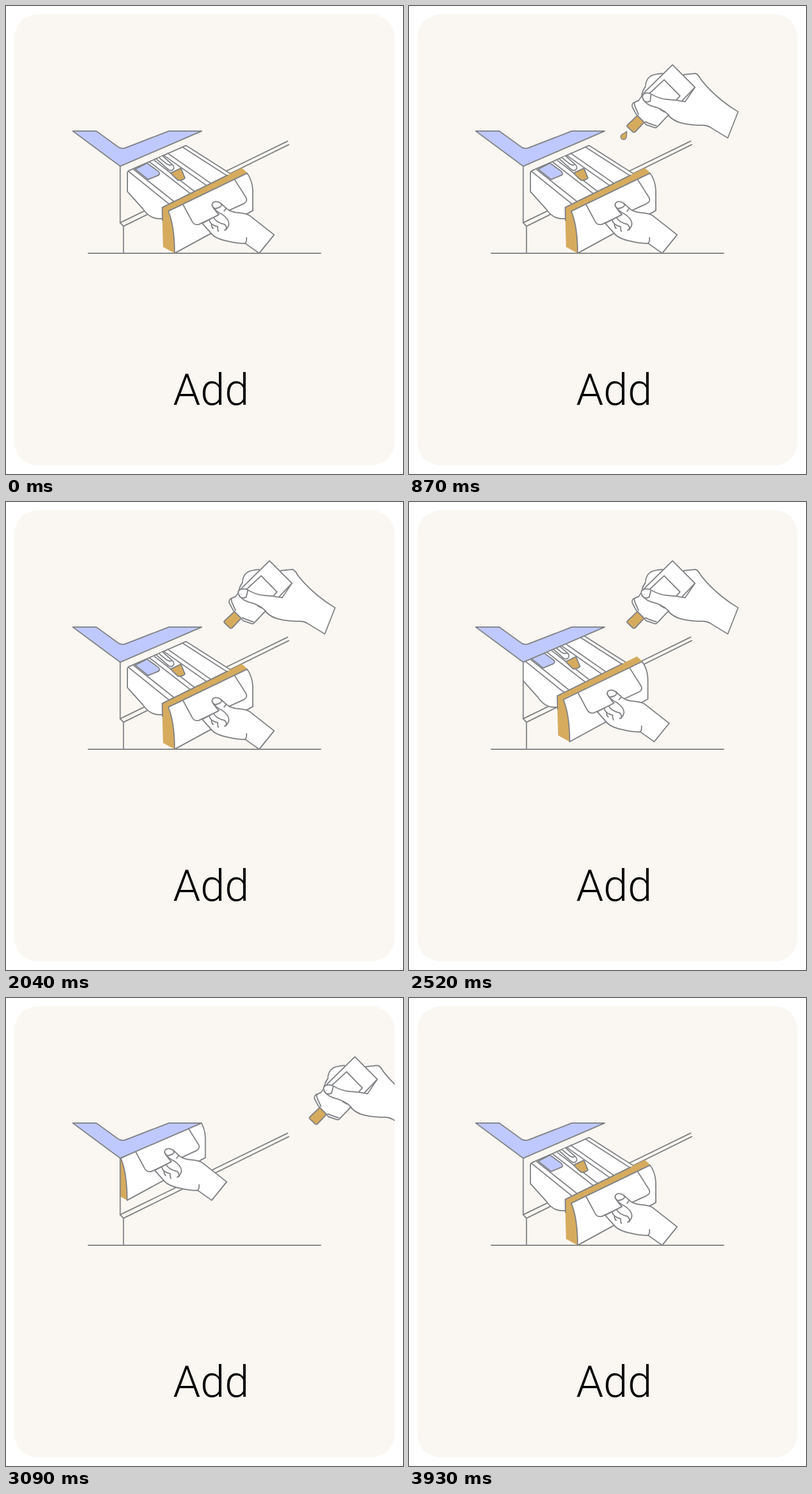
An HTML page that plays this animation: 690x812 px, repeating every 4.53 s.

```html
<!DOCTYPE html>
<html lang="en">
<head>
<meta charset="utf-8">
<title>Add</title>
<style>
  html, body { margin: 0; width: 100%; height: 100%; overflow: hidden; background: #fff; }
  svg { display: block; width: 690px; height: 812px; }
  .line, .white, .blue, .gold { stroke: #808285; stroke-width: 2; stroke-linejoin: round; stroke-linecap: round; }
  .line { fill: none; }
  .white { fill: #fff; }
  .blue { fill: #bfc9fd; }
  .gold { fill: #d6ab5e; }
  .bare { stroke: none; }
  text { font: 300 76px Roboto, sans-serif; }
</style>
</head>
<body>
<svg viewBox="0 0 690 812">
  <defs>
    <clipPath id="cardClip"><rect x="14" y="14" width="661.5" height="784"/></clipPath>
    <clipPath id="cabinetClip"><path d="M198.5 278L340 217V0H690V812H198.5Z"/></clipPath>
  </defs>

  <rect x="14.5" y="14.5" width="661" height="782.5" rx="40" fill="#faf7f2"/>
  <text x="290.5" y="692">Add</text>

  <path class="line" d="M143 429H547M198.5 376L489.5 234.5M204.5 382L491.5 240.5"/>

  <g clip-path="url(#cabinetClip)">
    <g id="drawer">
      <!-- tray -->
      <path class="white bare" d="M211 289L313 242L390 291L290 368H264Q249 368 238 352L211 322Z"/>
      <path class="line" d="M275 369H264Q249 368 238 352L211 322V290Q211 287 214 285.5L313 242L390 291"/>
      <path class="line" d="M213 287L284 344M221 283L293 340M250 271L321 326M258 268L328 322M274 259L348 311M281 255.5L355 307M307 245L385 295"/>
      <path class="blue" d="M224.5 283L245 272.5L265 287Q269 292 264 294L247 301Z"/>
      <path class="white" d="M262 266L279 281Q285 287 289 285Q294 281 290 276L272 260"/>
      <path class="line" d="M267 264L278 273Q284 278 288 275"/>
      <path class="gold" d="M286 290L304 281.5L311 298.5Q306 303 299 302.5Z"/>
      <!-- front -->
      <path class="gold bare" d="M271 349L410 281L420 290L282 356Q293 380 293 429L273 418Z"/>
      <path class="line" d="M272 372L271.5 349.5L385 293.5"/>
      <path class="white" d="M282 356L419 290Q428 302 429 320V355L293 429Q293 382 282 356Z"/>
      <path class="line" d="M308 345L322 371Q326 381 335 379L413 343Q421 339 417 332L398 302"/>
      <!-- pulling hand -->
      <path class="white" d="M341 377L358 396Q365 404 385 408Q401 412 416 412L440 429L466 397L424 364Q418 360 407 359Q391 358 384 352L373 342Q365 337 360 341Q356 345 361 351Q366 358 370 362Z"/>
      <path class="line" d="M358 346Q365 357 375 361Q387 369 387.5 378Q386 386 380 389"/>
      <path class="line" d="M353 371Q355 380 368 383Q367 387 369 391M361 367Q364 375 380 379Q384 383 383 388M357 379Q357 383 360 386"/>
      <path class="line" d="M361 351Q368 352 373 348Q376 346 373 342M379 356L382 352M418 402Q419 409 415 412"/>
    </g>
  </g>

  <path class="blue" d="M116 217H157L193 243Q200 249 208 246L283 217H340L198.5 278Z"/>
  <path class="line" d="M198.5 278V376L204.2 382V429"/>

  <path id="drop" class="gold" style="stroke-width:1.5" d="M4.5 -7.5Q5 0 4 3A5 5 0 1 1 -3.5 -2.5Q1 -4 4.5 -7.5Z"/>

  <g clip-path="url(#cardClip)">
    <g id="bottle">
      <path class="white" d="M478 119L498 117Q503 119 507 127L517 139Q541 165 572 183.5L554 229L523 210Q515 206 505 207Q480 206 467 201Q455 196 449 187Z"/>
      <path class="white" d="M404 157Q406 146 411 140Q411 128 420 121.5Q427 118 440 117L445 130Z"/>
      <path class="gold" d="M397 190L409 201.5L393 218.5Q391 220 389 218.5L380 210Q378 208 380 206Z"/>
      <path class="white" d="M458 102L497 141L432 209Q430 212 427 211L412 206L409 202L397 190L395 188L388 175Q387 171 390 168L399 164L410 149Z"/>
      <path class="line" d="M392 167.5Q391 171 393 175L399 188M411 201L418 204L430 208"/>
      <path class="line" d="M409 160L443.5 128L471 156L462 166M437 180L444 184"/>
      <path class="white bare" d="M406 156L411 151L421 153Q435 161 448 162Q465 163 480 166L502 141L520 190L490 203L449 187Q440 178 420 173Z"/>
      <path class="line" d="M497 141L480 166"/>
      <path id="thumb" class="white"/>
      <path class="line" d="M449 187Q455 196 467 201"/>
    </g>
  </g>
</svg>

<script>
  const LOOP = 4530, STEP = 30;
  const [drawer, drop, bottle, thumb] =
    ['drawer', 'drop', 'bottle', 'thumb'].map(id => document.getElementById(id));

  const progress = (t, from, to) => Math.min(1, Math.max(0, (t - from) / (to - from)));
  const ease = (t, from, to) => {
    const u = progress(t, from, to);
    return u * u * (3 - 2 * u);
  };
  const place = (node, x, y) => node.setAttribute('transform', `translate(${x.toFixed(2)} ${y.toFixed(2)})`);
  const show = (node, on) => node.setAttribute('visibility', on ? 'visible' : 'hidden');

  // Each drop starts hidden behind the cap and speeds up as it falls.
  const drops = [
    { from: 600, to: 1260, dx: -78, dy: 102, px: 1.9, py: 2 },
    { from: 1260, to: 2035, dx: -59, dy: 106, px: 1.1, py: 1.5 }
  ];

  function drawDrop(t) {
    const d = drops.find(d => t >= d.from && t < d.to);
    show(drop, d);
    if (!d) return;
    const u = progress(t, d.from, d.to);
    place(drop, 388 + d.dx * u ** d.px, 208 + d.dy * u ** d.py);
  }

  function drawThumb(t) {
    const squeeze = 2 * Math.sin(Math.PI * progress(t, 585, 1110));
    const x = 403.5 + squeeze;
    thumb.setAttribute('d',
      `M480 166Q465 163 448 162Q435 161 421 153Q416 150 ${x + 7} 151Q${x} 152 ${x} 158` +
      `Q${x + 3} 168 420 173Q440 178 449 187` +
      `M420.5 153L${x + 14} 165Q${x + 6} 169 ${x + 1} 162`);
  }

  function draw(t) {
    const closed = ease(t, 2385, 2905) - ease(t, 3335, 3915);
    place(drawer, -82.5 * closed, -78 * closed);

    const away = 1 - ease(t, 30, 565) + ease(t, 2955, 3227);
    place(bottle, 300 * away, 0);
    show(bottle, away < 1);

    drawThumb(t);
    drawDrop(t);
  }

  // The picture advances in fixed steps; the small lead absorbs timer jitter.
  const start = performance.now() - 6;
  function tick() {
    const t = (performance.now() - start) % LOOP;
    draw(Math.floor(t / STEP) * STEP);
    requestAnimationFrame(tick);
  }
  tick();
</script>
</body>
</html>
```
